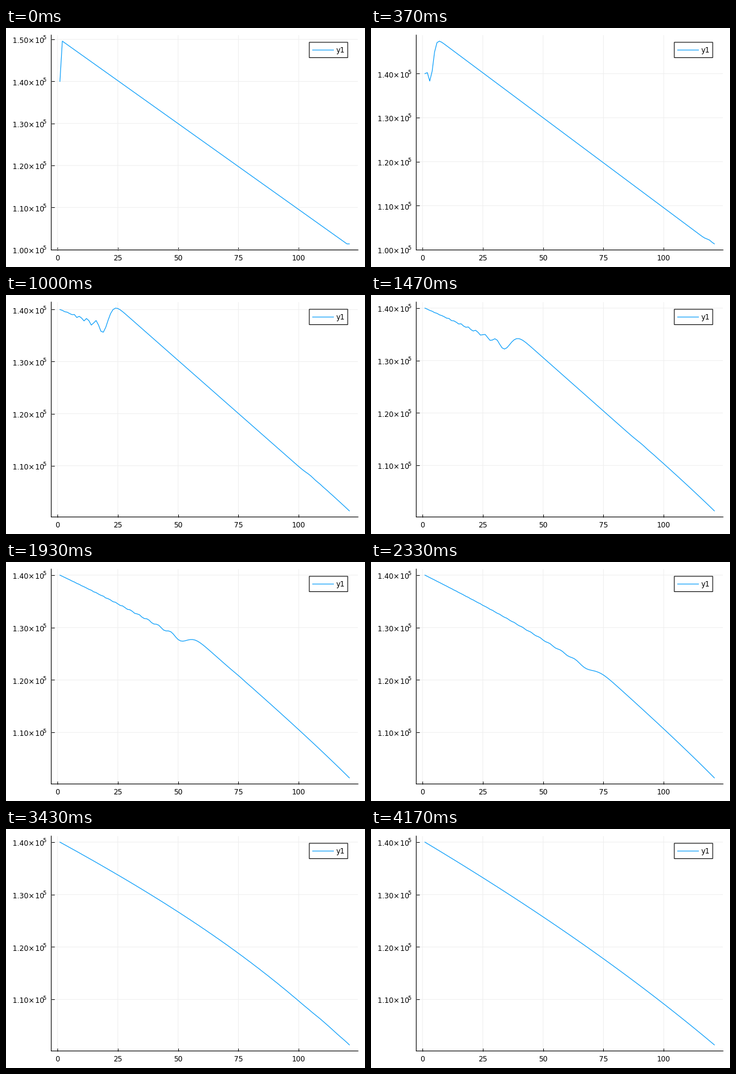
These frames come from a looping animation (600 px wide and 400 px high, 4.23 s). A matplotlib script:

```python
import math

import matplotlib.pyplot as plt
import numpy as np
from matplotlib.animation import FuncAnimation
from matplotlib.patches import Rectangle

W, H, DPI = 600, 400, 100
LOOP, TICK = 4230, 10              # ms
STATES, RATE = 127, 0.03           # solver states, states per ms
PT = 72 / DPI                      # points per pixel
BLUE = "#009afa"
LEFT, RIGHT, TOP, BOTTOM = 75.6, 588.4, 11.8, 371.5

plt.rcParams["font.family"] = "DejaVu Sans"
plt.rcParams["path.snap"] = False

# Gas pipe: pressure on 121 nodes, mass flow on the 120 faces between them.
# Units: cell length 1, sound speed 1.
NODES = 121
P_IN, P_START, P_OUT = 140000, 150000, 101325
FLOW, FRICTION = 11500, 7980


def rates(p, m):
    mid = np.concatenate([m[:1], (m[1:] + m[:-1]) / 2, m[-1:]])
    drag = FRICTION * m * 2 / (p[1:] + p[:-1])
    dp = np.zeros(NODES)
    dp[1:-1] = -np.diff(m)
    return dp, -np.diff(p + mid**2 / p) - drag


def rk4(p, m, h):
    a = rates(p, m)
    b = rates(p + a[0] * h / 2, m + a[1] * h / 2)
    c = rates(p + b[0] * h / 2, m + b[1] * h / 2)
    d = rates(p + c[0] * h, m + c[1] * h)
    return [y + h / 6 * (k1 + 2 * k2 + 2 * k3 + k4)
            for y, k1, k2, k3, k4 in zip((p, m), a, b, c, d)]


def time_step(i):
    """Time step before state i: tiny at first, growing as the wave fades."""
    if i < 4 or i == STATES - 1:
        return 0
    knots = [4, 5, 19, 30, 58, 82, 103, 125]
    steps = [0.12, 0.47, 0.87, 1.03, 1.27, 1.68, 2.55, 20]
    return math.exp(np.interp(i, knots, np.log(steps)))


def simulate():
    p = np.append(np.linspace(P_START, P_OUT, NODES - 1), P_OUT)
    p[0] = P_IN
    m = np.full(NODES - 1, float(FLOW))
    states = []
    for i in range(STATES):
        dt = time_step(i)
        n = math.ceil(dt / 0.25)
        for _ in range(n):
            p, m = rk4(p, m, dt / n)
        states.append(p)
    return states


states = simulate()

fig = plt.figure(figsize=(W / DPI, H / DPI), dpi=DPI, facecolor="white")
ax = fig.add_axes([LEFT / W, 1 - BOTTOM / H, (RIGHT - LEFT) / W, (BOTTOM - TOP) / H])
ax.spines[["top", "right"]].set_visible(False)
for side in ("left", "bottom"):
    ax.spines[side].set_linewidth(1.1 * PT)
    ax.spines[side].set_snap(False)
ax.set_axisbelow(True)
ax.grid(color="#efefef", lw=PT, snap=False)
ax.tick_params(direction="in", length=5 * PT, width=PT, labelsize=12 * PT, pad=7.1 * PT)
ax.tick_params(axis="y", labelleft=False)

levels = [k * 10000 for k in range(10, 16)]
ax.set_xticks(range(0, 101, 25))
ax.set_yticks(levels)
ax.set_xlim(-2.6, 124.6)


def y_text(level, text, dx, dy, size):
    return ax.annotate(text, (0, level), xycoords=ax.get_yaxis_transform(),
                       xytext=(dx * PT, dy * PT), textcoords="offset points",
                       fontsize=size * PT, va="baseline", annotation_clip=False)


labels = [(v, y_text(v, f"{v / 1e5:.2f}×\u200a10", -64.9, -6.2, 12),
           y_text(v, "5", -14.3, -0.3, 9.3)) for v in levels]

curve, = ax.plot(range(1, NODES + 1), states[0], color=BLUE, lw=1.15 * PT)

# Legend, in pixel coordinates
key = fig.add_axes([0, 0, 1, 1], zorder=5)
key.axis("off")
key.set_xlim(0, W)
key.set_ylim(H, 0)
key.add_patch(Rectangle((506.9, 23.9), 64.2, 25.7, fc="white", ec="black",
                        lw=1.1 * PT, snap=False))
key.plot([512.4, 547.4], [36.9, 36.9], color=BLUE, lw=1.15 * PT)
key.text(552, 41.3, "y1", fontsize=12 * PT, va="baseline")


def draw(tick):
    p = states[int((tick + 0.5) * TICK * RATE)]
    pad = 0.03 * np.ptp(p)
    low, high = p.min() - pad, p.max() + pad
    ax.set_ylim(low, high)
    curve.set_ydata(p)
    for level, *texts in labels:
        for text in texts:
            text.set_visible(low <= level <= high)


anim = FuncAnimation(fig, draw, frames=LOOP // TICK, interval=TICK,
                     repeat=True, repeat_delay=0, init_func=lambda: draw(0))
plt.show()
```
